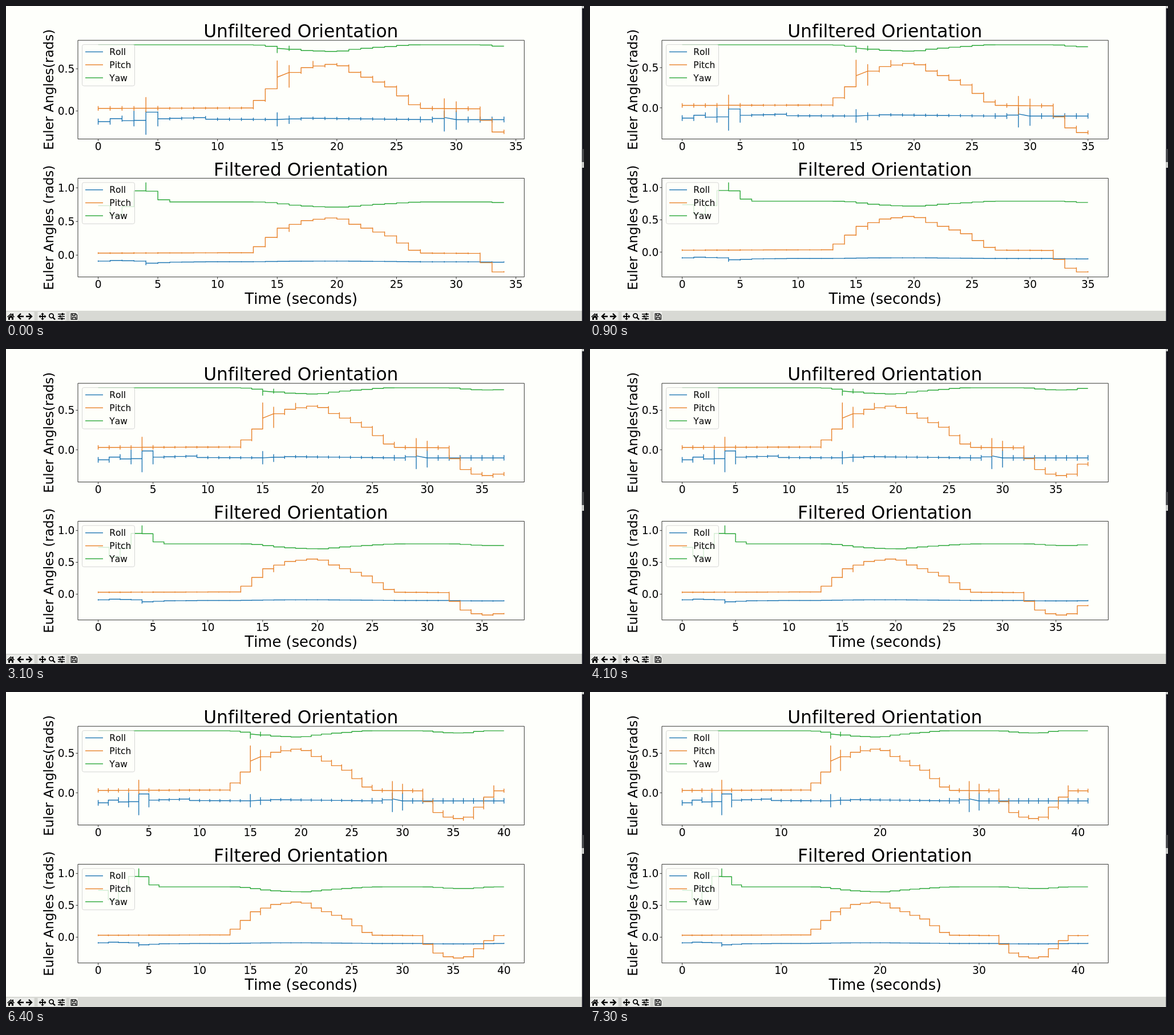
Recreate the animation shown at these times as an HTML page. Size 1013x553 px, loop 8000 ms.

```html
<!DOCTYPE html>
<html lang="en">
<head>
<meta charset="utf-8">
<title>Orientation plots</title>
<style>
  html, body { margin: 0; width: 100%; height: 100%; overflow: hidden; background: #fefffb; }
  svg { display: block; }
  text {
    font-family: "DejaVu Sans", sans-serif; font-size: 18.6px; text-anchor: middle;
    font-kerning: none; font-variant-ligatures: none;
  }
  .title { font-size: 31.3px; }
  .time { font-size: 25.8px; }
  .side { font-size: 23px; }
  .key { font-size: 15.5px; text-anchor: start; }
  .line { fill: none; stroke-width: 1.4; stroke-linejoin: round; }
  .axis { fill: none; stroke: #222; stroke-width: .9; }
  .box { fill: #fefffb; fill-opacity: .8; stroke: #ccc; stroke-opacity: .8; }
  .icon { fill: none; stroke: #000; stroke-width: 1.8; }
</style>
</head>
<body>
<svg width="1013" height="553" viewBox="0 0 1013 553">
  <g id="plots"></g>
  <path fill="#d8d9d4" d="M0 535H1010V553H0Z"/>
  <path fill="#ecedea" d="M1 537H49V552H1ZM56 537H105V552H56ZM112 537H126V552H112Z"/>
  <path fill="#14151d" d="M1009.5 0H1013V553H1009.5Z"/>
  <path fill="#c9cac8" d="M1009 0H1013V4H1009ZM1009 274H1013V284H1009Z"/>
  <path fill="#45464a" d="M1009.5 251H1013V274H1009.5Z"/>
  <path stroke="#c4c5c0" d="M52.5 537V552M108.5 537V552"/>
  <path d="M2 545.5L8.5 539.5L11 541.8V540H13V543.6L15 545.5L14 546.5L8.5 541.5L3 546.5ZM4 546.5L8.5 542.5L13 546.5V551H10V547.5H7V551H4Z"/>
  <g class="icon">
    <path stroke-width="2.4" d="M26 540L21 545L26 550M21 545H31M40 540L45 545L40 550M45 545H35"/>
    <path d="M59 545H69M64 540V550"/>
    <circle cx="79.5" cy="543.8" r="3.7"/>
    <path stroke-width="2.4" d="M82 546.5L86 550.5"/>
    <path stroke-width="1.4" d="M91 541H103M91 545H103M91 549H103"/>
    <path stroke-width="2.4" d="M99 539V543M95 543V547M98 547V551"/>
    <path stroke-width="1.3" d="M114.2 540.2H122L124.4 542.6V550.2H114.2ZM116.5 540V543.5H121V540M116.5 550V546.5H122V550"/>
  </g>
  <path d="M57.5 545L60.5 542V548ZM70.5 545L67.5 542V548ZM64 538.5L61 541.5H67ZM64 551.5L61 548.5H67Z"/>
</svg>
<script>
const LOOP = 8000, STEPS = [900, 1900, 3100, 4100, 5200, 6400, 7300];
const COLORS = ["#1f77b4", "#e8822a", "#2ca83a"], NAMES = ["Roll", "Pitch", "Yaw"];
const LEFT = 126, RIGHT = 908.3, HEIGHT = 173.3;

// straight lines between [time, value] points, constant after the last
const curve = (...keys) => t => {
  const i = keys.findIndex(k => k[0] > t);
  if (i < 1) return keys.at(i)[1];
  const [t0, v0] = keys[i - 1], [t1, v1] = keys[i];
  return v0 + (v1 - v0) * (t - t0) / (t1 - t0);
};

// one tilt up, then a shorter one down
const pitch = curve([0, .03], [12, .035], [13, .125], [15, .4], [17, .513], [19, .552], [20, .535],
  [21, .458], [24, .285], [26, .073], [27, .03], [31, .025], [33, -.25], [34, -.308], [35, -.327],
  [36, -.308], [38, -.055], [39, .025]);
const roll = curve([0, -.127], [1, -.092], [2, -.116], [3, -.112], [4, -.015], [5, -.093], [8, -.08],
  [9, -.098], [15, -.102], [17, -.087], [27, -.103], [29, -.077], [30, -.103]);
const yaw = t => .785 - .26 * pitch(t) ** 2;

// the filter settles during the first seconds
const rollSettle = curve([0, .01], [1, .02], [3, .01], [4, -.02], [6, -.005], [9, 0]);
const yawSettle = curve([0, -.05], [1, -.195], [2, -.065], [3, .17], [4, .165], [5, .037], [6, .005]);

// spikes: second -> [low, high]; sloped: seconds without a flat step
const charts = [
  { top: 60.2, title: "Unfiltered Orientation", side: "Euler Angles(rads)", sloped: [15, 29], traces: [
    { level: roll, noise: .016, spikes: { 3: [-.18, 0], 4: [-.28, 0], 5: [-.18, -.01],
      15: [-.18, -.02], 16: [-.15, -.06], 29: [-.24, 0], 30: [-.22, 0] } },
    { level: pitch, noise: .012, spikes: { 4: [-.01, .16], 15: [.27, .595], 16: [.28, .54],
      18: [.51, .59], 29: [-.08, .145], 30: [-.01, .11], 39: [-.06, .09] } },
    { level: yaw, noise: 0, spikes: { 15: [.69, .765], 16: [.715, .77] } }
  ] },
  { top: 302.4, title: "Filtered Orientation", side: "Euler Angles (rads)", sloped: [], traces: [
    { level: t => -.1 + .02 * pitch(t) + rollSettle(t), noise: .003, spikes: { 4: [-.145, -.085] } },
    { level: pitch, noise: .004, spikes: { 16: [.35, .43], 39: [-.05, .03] } },
    { level: t => yaw(t - .5) + yawSettle(t), noise: 0, spikes: { 4: [.95, 1.075] } }
  ] }
];

// each second: arrive, spike, then step to the next level
function points({ level, noise, spikes }, sloped, end) {
  const out = [];
  for (let k = 0; k <= end; k++) {
    const from = level(sloped.includes(k - 1) ? k : Math.max(k - 1, 0));
    const spread = k < 6 || k > 26 ? 2 * noise : noise;
    const [low, high] = spikes[k] ?? [from - spread, from + spread];
    out.push([k, from], [k, high], [k, low]);
    if (k < end) out.push([k, level(k)]);
  }
  return out;
}

const label = (x, y, s, cls = "", more = "") => `<text class="${cls}" x="${x}" y="${y}" ${more}>${s}</text>`;

function drawChart({ top, title, side, sloped, traces }, end) {
  const lines = traces.map(t => points(t, sloped, end));
  const values = lines.flat().map(p => p[1]);
  const max = Math.max(...values), min = Math.min(...values);
  const pad = HEIGHT / 22, width = RIGHT - LEFT, bottom = top + HEIGHT;
  const X = t => LEFT + width / 22 * (1 + 20 * t / end);
  const Y = v => top + pad + (max - v) / (max - min) * 20 * pad;
  let ticks = "", svg = "";

  lines.forEach((line, i) => {
    const pts = line.map(([t, v]) => X(t).toFixed(2) + "," + Y(v).toFixed(2)).join(" ");
    svg += `<polyline class="line" stroke="${COLORS[i]}" points="${pts}"/>`;
  });
  const step = end > 40 ? 10 : 5;
  for (let t = 0; t <= end * 1.05; t += step) {
    ticks += `M${X(t)} ${bottom}v3.6`;
    svg += label(X(t), top + 192.5, t);
  }
  for (let v = 0; v < max; v += .5) {
    ticks += `M${LEFT} ${Y(v)}h-3.6`;
    svg += label(120.3, Y(v) + 6.8, v.toFixed(1), "", 'style="text-anchor:end"');
  }
  svg += `<path class="axis" d="M${LEFT} ${top}H${RIGHT}V${bottom}H${LEFT}Z${ticks}"/>`;
  svg += `<rect class="box" x="133.5" y="${top + 7.5}" width="92" height="72.5" rx="3"/>`;
  NAMES.forEach((name, i) => {
    const y = top + 20.3 + i * 22.8;
    svg += `<path class="line" stroke="${COLORS[i]}" d="M139 ${y}H170"/>` + label(181.3, y + 5.5, name, "key");
  });
  const mid = top + HEIGHT / 2;
  return svg + label(516.8, Math.round(top - 4.8), title, "title") +
    label(83.5, mid, side, "side", `transform="rotate(-90 83.5 ${mid})"`);
}

const plots = document.getElementById("plots");
let shown;
function frame() {
  const t = performance.now() % LOOP;
  const end = 34 + STEPS.filter(s => t >= s).length;
  if (end !== shown) {
    shown = end;
    plots.innerHTML = charts.map(c => drawChart(c, end)).join("") + label(517.3, 522.6, "Time (seconds)", "time");
  }
  requestAnimationFrame(frame);
}
frame();
</script>
</body>
</html>
```
